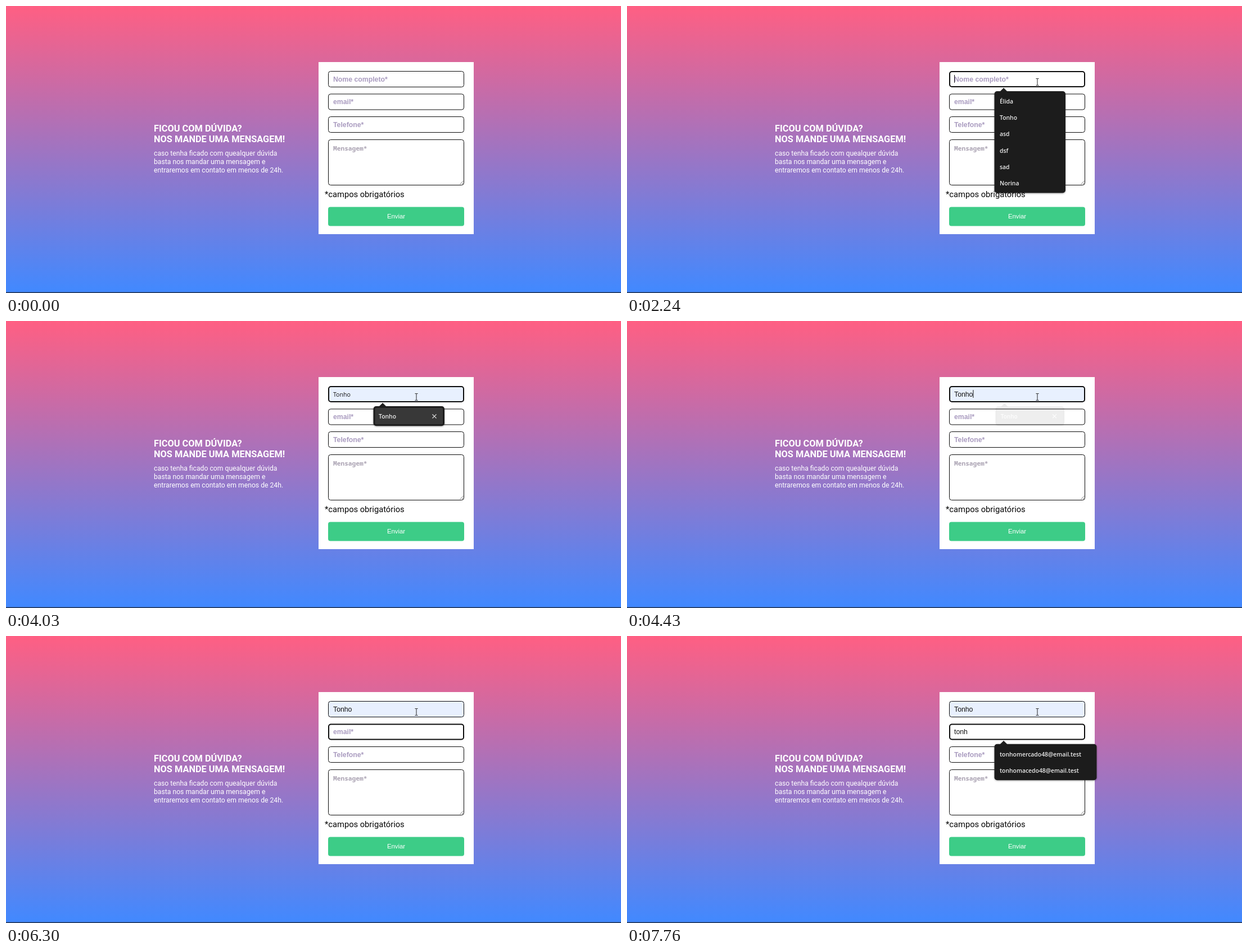
Animation of 1094 by 512 pixels, one loop 8000 ms. Source, as an HTML page:

```html
<!DOCTYPE html>
<html lang="pt-BR">
<head>
<meta charset="utf-8">
<title>Formulário de contato</title>
<style>
html, body { margin: 0; width: 100%; height: 100%; overflow: hidden; }
svg { display: block; width: 100%; height: 100%; }
text { white-space: pre; }
.title { font: 700 16.35px Roboto, sans-serif; fill: #fff; }
.info { font: 12.2px Roboto, sans-serif; fill: #fff; }
.note { font: 14.7px Roboto, sans-serif; fill: #050505; }
.send { font: 11.3px "Liberation Sans", Arial, sans-serif; fill: #fff; text-anchor: middle; }
.hint { font: 700 12.27px "Liberation Sans", Arial, sans-serif; fill: #aa9cc0; }
.mono { font: 700 11.2px "Noto Sans Mono", monospace; fill: #aaa2b2; }
.value { font: 12.27px "Liberation Sans", Arial, sans-serif; fill: #111; }
.preview { font: 10.6px "Open Sans", sans-serif; fill: #111; }
.option { font: 600 10.4px "Open Sans", sans-serif; fill: #ececec; }
</style>
</head>
<body>
<svg viewBox="0 0 1094 512" preserveAspectRatio="none">
  <defs>
    <linearGradient id="sky" x2="0" y2="1">
      <stop stop-color="#ff5f83"/><stop offset="1" stop-color="#4189ff"/>
    </linearGradient>
    <filter id="shade" x="-10%" y="-10%" width="120%" height="130%">
      <feDropShadow dx="0" dy="1" stdDeviation="1.5" flood-opacity=".35"/>
    </filter>
  </defs>
  <rect width="1094" height="511" fill="url(#sky)"/>
  <rect y="510.5" width="1094" height="1.5" fill="#24324a"/>
  <text class="title" x="263" y="223.6">FICOU COM DÚVIDA?</text>
  <text class="title" x="263" y="243.2">NOS MANDE UMA MENSAGEM!</text>
  <text class="info" x="263" y="267.3">caso tenha ficado com quealquer dúvida</text>
  <text class="info" x="263" y="282">basta nos mandar uma mensagem e</text>
  <text class="info" x="263" y="296.7">entraremos em contato em menos de 24h.</text>
  <rect x="556" y="100" width="276" height="307" fill="#fff"/>
  <text class="note" x="567" y="341.3">*campos obrigatórios</text>
  <rect x="573" y="358.5" width="242" height="34" rx="4" fill="#3dcc87"/>
  <text class="send" x="694" y="379">Enviar</text>
  <g id="live"></g>
</svg>
<script>
const LOOP = 8000, NAME = 'Tonho', TYPED = 'tonh';
const NAMES = ['Élida', NAME, 'asd', 'dsf', 'sad', 'Norina'];
const MAILS = ['tonhomercado48@email.test', 'tonhomacedo48@email.test'];
const live = document.getElementById('live');
const pen = document.createElement('canvas').getContext('2d');
pen.font = '12.27px "Liberation Sans", Arial, sans-serif';

const label = (cls, x, y, s) => `<text class="${cls}" x="${x}" y="${y}">${s}</text>`;
const line = (d, color, w = 1) => `<path d="${d}" fill="none" stroke="${color}" stroke-width="${w}"/>`;

// Last value in [time, value, time, value, ...] whose time has come
function at(t, ...steps) {
  let v;
  for (let i = 0; i < steps.length && steps[i] <= t; i += 2) v = steps[i + 1];
  return v;
}

function box(y, h, focus, fill = '#fff') {
  const w = focus ? 2 : 1;
  return `<rect x="${573 + w / 2}" y="${y + w / 2}" width="${242 - w}" height="${h - w}" rx="4"
    fill="${fill}" stroke="#0b0b0b" stroke-width="${w}"/>`;
}

function field(y, hint, value, focus, caret, fill, cls = 'value') {
  const x = 582.5 + pen.measureText(value).width;
  return box(y, 29, focus, fill) +
    (value ? label(cls, 582, y + 18.7, value) : label('hint', 582, y + 18.7, hint)) +
    (caret ? line(`M${x} ${y + 7}v14`, '#111') : '');
}

function popup(y, w, rows, picked, opacity = 1) {
  const h = 6 + 29.25 * rows.length, mid = 653.5 + w / 2, s = .965 + .035 * opacity;
  const cross = line(`M758.5 ${y + 14.5}l7 7m0 -7l-7 7`, '#ddd', 1.2);
  return `<g opacity="${opacity}" transform="translate(${mid} ${y + 14}) scale(${s}) translate(${-mid} ${-y - 14})">
    <path d="M663 ${y + 1}l7 -7 7 7z" fill="#1f1f1f"/>
    <rect x="653.5" y="${y}" width="${w}" height="${h}" rx="5" fill="#1f1f1f" filter="url(#shade)"/>` +
    (picked ? `<rect x="656.5" y="${y + 3}" width="${w - 6}" height="${h - 6}" rx="2" fill="#383838"/>${cross}` : '') +
    rows.map((s, i) => label('option', 663, y + 21.8 + 29.25 * i, s)).join('') + '</g>';
}

function pointer(t) {
  if (t < 70) return '';
  let x, y;
  if (t < 890) {
    const p = Math.min(11, Math.floor((t - 70) / 69)) / 11, e = p * p * (3 - 2 * p);
    x = 1008 - 281 * e;
    y = 468 - 321 * e;
  } else {
    [x, y] = at(t, 890, [727, 141], 960, [728, 137], 1030, [728.5, 134.5],
      1430, [729.5, 135], 1500, [729.5, 135.5], 2100, [730, 135.5]);
  }
  const inside = x > 573 && x < 815 &&
    [[116, 145], [157, 185], [197, 226], [238, 320]].some(([a, b]) => y >= a && y <= b);
  const halo = t >= 1100 && t < 1230 ? '<circle cx="727" cy="134" r="9.8" fill="#fbf56c"/>' : '';
  return halo + (inside
    ? line(`M${x - 2.5} ${y - 6}h2l.5 .5 .5 -.5h2M${x} ${y - 6}v12M${x - 2.5} ${y + 6}h2l.5 -.5 .5 .5h2`, '#222')
    : `<path d="M${x} ${y}v15l3.5 -3.2 2.3 5.2 2.2 -1 -2.3 -5h4.8z" fill="#fff" stroke="#111" stroke-width=".9"/>`);
}

function frame(t) {
  const focus = at(t, 0, 0, 1100, 1, 4700, 2);
  const name = at(t, 0, '', 2700, 't', 2830, 'to', 2960, 'ton', 3960, NAME);
  const mail = at(t, 0, '', 6770, 't', 6900, 'to', 7030, 'ton', 7230, TYPED);
  const caret = at(t, 0, false, 1100, true, 1700, false, 2240, true, 3490, false, 4290, true,
    5230, false, 5770, true, 6300, false, 6770, true, 7760, false);
  const preview = t >= 3960 && t < 4290;

  let out = field(116, 'Nome completo*', name, focus === 1, caret && focus === 1,
      t >= 3960 ? '#e8f0fe' : '#fff', preview ? 'preview' : 'value') +
    field(156.5, 'email*', mail, focus === 2, caret && focus === 2) +
    field(197, 'Telefone*', '') +
    box(238, 82) + label('mono', 582, 258.3, 'Mensagem*') +
    line('M807.5 318l6 -6m-2.5 6l2.5 -2.5', '#555', .8);

  if (t >= 1230 && t < 2700) out += popup(152, 126.5, NAMES);
  else if (t >= 2700 && t < 4500)
    out += popup(152, 126.5, [NAME], t >= 3960, at(t, 0, 1, 4290, .7, 4360, .35, 4430, .08));
  else if (t >= 6830) out += popup(192.7, 182, MAILS);
  live.innerHTML = out + pointer(t);
}

function tick() {
  frame(performance.now() % LOOP);
  requestAnimationFrame(tick);
}
tick();
</script>
</body>
</html>
```
